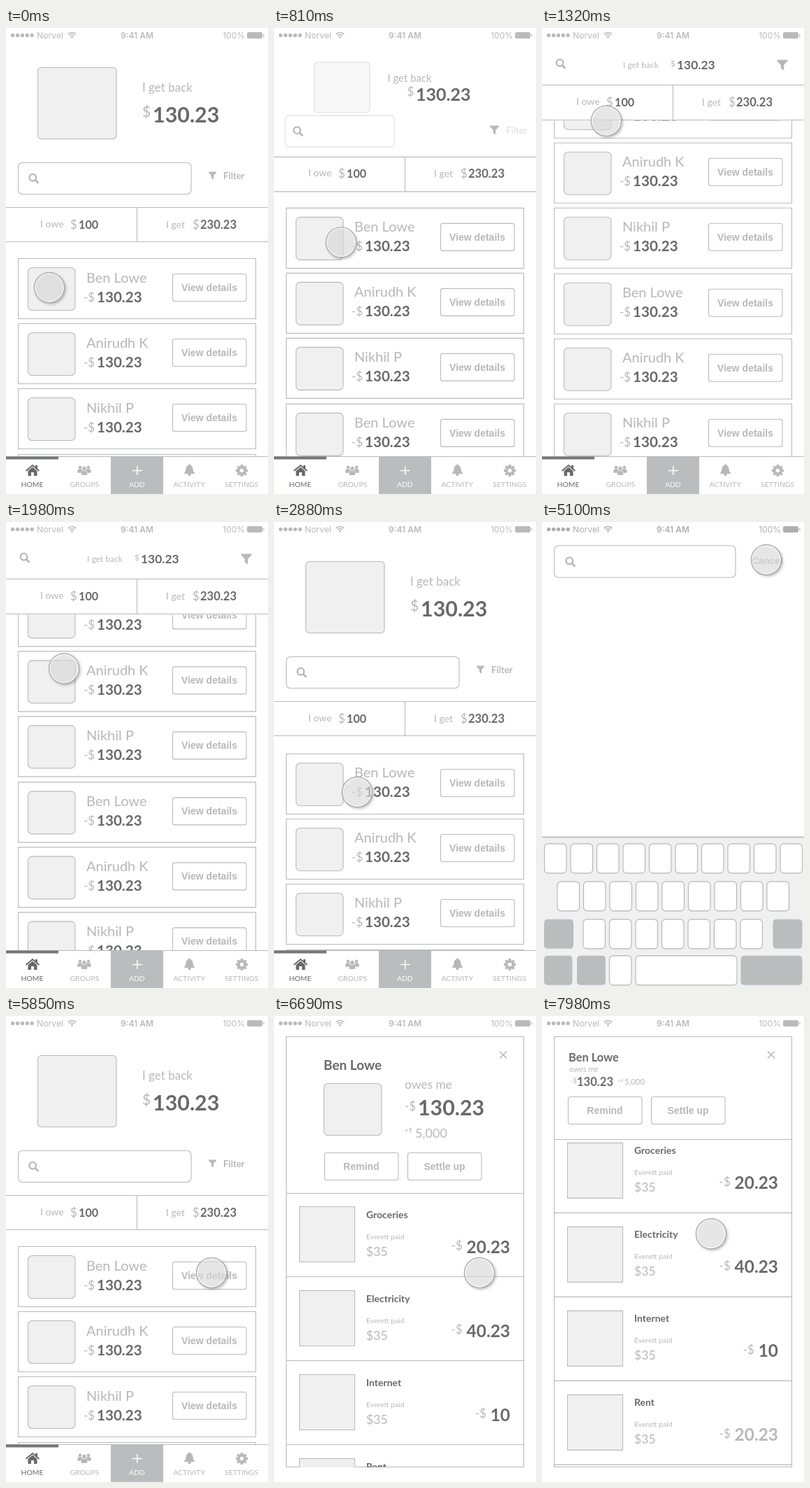
An HTML page with a canvas that plays this animation: 375x666 px, repeating every 8000 ms.

```html
<!DOCTYPE html>
<html lang="en">
<head>
<meta charset="utf-8">
<title>Shared expenses wireframe</title>
<style>
html, body { margin: 0; width: 100%; height: 100%; overflow: hidden; background: #fff; }
canvas { display: block; width: 375px; height: 666px; }
</style>
</head>
<body>
<canvas id="stage"></canvas>
<script>
const W = 375, H = 666, LOOP = 8000;
const LIGHT = '#b7b8b9', DARK = '#68696a', LINE = '#b9babb', FILL = '#f0f0f0', GREY = '#bbbcbd';
const LATO = 'Lato, "Open Sans", "Noto Sans", sans-serif';
const ARIAL = '"Liberation Sans", Arial, sans-serif';
const INTER = 'Inter, Roboto, sans-serif';
const PEOPLE = ['Ben Lowe', 'Anirudh K', 'Nikhil P'];
const BILLS = [['Groceries', '20.23'], ['Electricity', '40.23'], ['Internet', '10'], ['Rent', '20.23']];

const canvas = document.getElementById('stage');
const c = canvas.getContext('2d');
const dpr = window.devicePixelRatio || 1;
canvas.width = W * dpr;
canvas.height = H * dpr;

// [time, value...]
const POINTER = [
  [30, 62, 371], [270, 97, 371], [450, 97, 371], [1320, 92, 133], [1520, 88, 77], [1640, 84, 77],
  [1980, 83, 209], [2400, 119, 386], [2900, 119, 386], [3240, 137, 216], [4270, 137, 216],
  [4710, 321, 54], [5350, 321, 54], [5850, 294, 367], [7060, 294, 367], [7290, 242, 402],
  [7430, 242, 402], [8000, 242, 311]
];
const HOME_SCROLL = [
  [440, 0], [1320, 258], [1520, 318], [1660, 350], [1980, 238], [2350, 55], [2560, -14], [2880, -2], [3060, 0]
];
const BILL_SCROLL = [[7430, 0], [7980, 91], [8000, 92]];

const clamp = v => Math.max(0, Math.min(1, v));
const mix = (a, b, k) => a + (b - a) * k;
const mixAll = (a, b, k) => a.map((v, i) => mix(v, b[i], k));
const grey = v => `rgb(${v},${v},${v})`;
const ease = v => { const k = clamp(v), u = 1 - k; return 1 - u * u * u * (1 + 2 * k); };
const span = (t, a, b) => ease((t - a) / (b - a));

// Monotone cubic through the keys
function track(keys, t, n = 1) {
  const last = keys.length - 1;
  if (t <= keys[0][0]) return keys[0][n];
  if (t >= keys[last][0]) return keys[last][n];
  const slope = i => (keys[i + 1][n] - keys[i][n]) / (keys[i + 1][0] - keys[i][0]);
  const tangent = i => {
    if (i === 0 || i === last) return 0;
    const a = slope(i - 1), b = slope(i);
    return a * b <= 0 ? 0 : 2 * a * b / (a + b);
  };
  let i = 0;
  while (t > keys[i + 1][0]) i++;
  const h = keys[i + 1][0] - keys[i][0], u = (t - keys[i][0]) / h, v = 1 - u;
  return keys[i][n] * v * v * (1 + 2 * u) + keys[i + 1][n] * u * u * (3 - 2 * u)
    + h * u * v * (v * tangent(i) - u * tangent(i + 1));
}

function fade(alpha, draw) {
  if (alpha <= 0.002) return;
  c.save();
  c.globalAlpha *= clamp(alpha);
  draw();
  c.restore();
}

function clipTo(x, y, w, h, draw) {
  c.save();
  c.beginPath();
  c.rect(x, y, w, h);
  c.clip();
  draw();
  c.restore();
}

function text(s, x, y, size, color = LIGHT, weight = 400, font = LATO, align = 'left') {
  c.font = `${weight} ${size}px ${font}`;
  c.fillStyle = color;
  c.textAlign = align;
  c.fillText(s, x, y);
}

function box(x, y, w, h, r, fill, stroke = LINE, width = 1.1) {
  c.beginPath();
  c.roundRect(x, y, w, h, r);
  if (fill) { c.fillStyle = fill; c.fill(); }
  if (stroke) { c.strokeStyle = stroke; c.lineWidth = width; c.stroke(); }
}

function line(x1, y1, x2, y2, width = 1.1, color = LINE) {
  c.beginPath();
  c.moveTo(x1, y1);
  c.lineTo(x2, y2);
  c.strokeStyle = color;
  c.lineWidth = width;
  c.stroke();
}

function disc(x, y, r, color) {
  c.beginPath();
  c.arc(x, y, r, 0, Math.PI * 2);
  c.fillStyle = color;
  c.fill();
}

function ring(x, y, r, color, width) {
  c.beginPath();
  c.arc(x, y, r, 0, Math.PI * 2);
  c.strokeStyle = color;
  c.lineWidth = width;
  c.stroke();
}

function poly(points, color) {
  c.beginPath();
  points.forEach(([x, y]) => c.lineTo(x, y));
  c.closePath();
  c.fillStyle = color;
  c.fill();
}

function button(label, x, y) {
  box(x, y, 105.5, 39, 3);
  text(label, x + 52.5, y + 24.5, 14, LIGHT, 700, ARIAL, 'center');
}

function magnifier(x, y) {
  ring(x - 1.3, y - 1.3, 4.8, LIGHT, 2.3);
  c.lineCap = 'round';
  line(x + 2.5, y + 2.5, x + 6, y + 6, 2.8, LIGHT);
  c.lineCap = 'butt';
}

function funnel(x, y, size) {
  const p = [[-.5, -.5], [.5, -.5], [.5, -.38], [.14, 0], [.14, .52], [-.14, .3], [-.14, 0], [-.5, -.38]];
  poly(p.map(([a, b]) => [x + a * size, y + b * size]), LIGHT);
}

function statusBar(q) {
  const color = grey(Math.round(mix(186, 174, q)));
  for (let i = 0; i < 5; i++) disc(9.6 + i * 6.9, 10.5, 2.7, color);
  text('Norvel', 44, 14.6, 12.2, color, 400, INTER);
  c.strokeStyle = color;
  c.lineWidth = 1.6;
  for (const r of [8, 5]) {
    c.beginPath();
    c.arc(94.5, 14.5, r, -Math.PI * 0.76, -Math.PI * 0.24);
    c.stroke();
  }
  disc(94.5, 13, 1.6, color);
  text('9:41 AM', 187.5, 14.6, 12, color, 600, INTER, 'center');
  text('100%', 342, 14.6, 12, color, 400, INTER, 'right');
  box(345.5, 6.5, 21, 8, 1.5, color, color, 1);
  box(368, 8.7, 1.5, 3.6, .7, color, null);
}

function personRow(name, y) {
  box(17.5, y, 340, 86, 0);
  box(31.5, y + 13, 67.5, 61, 6, FILL);
  text(name, 115, y + 34, 20);
  text('-$', 111, y + 61, 17);
  text('130.23', 130, y + 62, 20.6, DARK, 700);
  button('View details', 238.5, y + 22);
}

function homeHeader(p) {
  fade(1 - p * 1.3, () => box(...mixAll([45.5, 56.5, 112.5, 102], [75, 38, 32, 29], p), 5, FILL));
  text('I get back', mix(195, 116, p), mix(91, 57, p), mix(17, 12, p));
  text('$', mix(195, 184, p), mix(127, 55, p), mix(21, 12, p));
  text('130.23', mix(210, 193, p), mix(135, 59, p), mix(30.4, 17.4, p), DARK, 700);
  funnel(mix(295.5, 344, p), mix(211, 53, p), mix(11, 15, p));
  fade(1 - p * 1.5, () => text('Filter', mix(311, 362, p), mix(216, 58, p), 13, LIGHT, 700));
}

function totals(p) {
  const y = 256.5 - 175 * p, bottom = mix(305.5, 131.5, p);
  line(0, y, W, y);
  line(0, bottom, W, bottom);
  line(187.5, y, 187.5, bottom);
  text('I owe', 49, y + 28, 14);
  text('$', 92, y + 30, 17);
  text('100', 104, y + 30, 16.2, DARK, 700);
  text('I get', 229, y + 29, 14);
  text('$', 267, y + 30, 17);
  text('230.23', 278, y + 30, 16.6, DARK, 700);
  return bottom;
}

function home(scroll) {
  const p = clamp(scroll / 175);
  homeHeader(p);
  const top = totals(p) + 1;
  clipTo(0, top, W, 612 - top, () => {
    for (let i = 0; i < 12; i++) {
      const y = 329.5 + Math.floor(i * 280 / 3) - scroll;
      if (y > -90 && y < 620) personRow(PEOPLE[i % 3], y);
    }
  });
}

function searchBox(p, q) {
  const rect = mixAll(mixAll([17.5, 192.5, 247.5, 45], [14, 29, 26, 45], p), [17.5, 33.5, 259.5, 45.5], q);
  fade(1 - p * 1.3, () => box(...rect, 6));
  magnifier(mix(mix(39.5, 26.8, p), 40.5, q), mix(mix(215, 51, p), 56.5, q));
}

function person(x, y, k, color) {
  disc(x, y - 4.2 * k, 2.8 * k, color);
  c.beginPath();
  c.roundRect(x - 4.6 * k, y - .8 * k, 9.2 * k, 6.6 * k, [3 * k, 3 * k, 1, 1]);
  c.fill();
}

function bell(x, y) {
  c.beginPath();
  c.moveTo(x - 8, y + 5);
  c.quadraticCurveTo(x - 5, y + 2, x - 5, y - 2);
  c.quadraticCurveTo(x - 4.5, y - 7, x, y - 7.5);
  c.quadraticCurveTo(x + 4.5, y - 7, x + 5, y - 2);
  c.quadraticCurveTo(x + 5, y + 2, x + 8, y + 5);
  c.fillStyle = LIGHT;
  c.fill();
  disc(x, y + 6, 2.2, LIGHT);
  disc(x, y - 7.5, 1.2, LIGHT);
}

function gear(x, y) {
  for (let i = 0; i < 8; i++) {
    const a = i * Math.PI / 4;
    line(x, y, x + 8.5 * Math.cos(a), y + 8.5 * Math.sin(a), 3.8, LIGHT);
  }
  disc(x, y, 6.5, LIGHT);
  disc(x, y, 2.8, '#fff');
}

function house(x, y) {
  poly([[x - 6.5, y + 1], [x, y - 4.5], [x + 6.5, y + 1], [x + 6.5, y + 8], [x + 2, y + 8],
    [x + 2, y + 3], [x - 2, y + 3], [x - 2, y + 8], [x - 6.5, y + 8]], DARK);
  poly([[x + 4, y - 7], [x + 7, y - 7], [x + 7, y - 1], [x + 4, y - 4]], DARK);
  c.beginPath();
  c.moveTo(x - 9.5, y + 1);
  c.lineTo(x, y - 7);
  c.lineTo(x + 9.5, y + 1);
  c.strokeStyle = DARK;
  c.lineWidth = 2;
  c.stroke();
}

function tabBar() {
  c.fillStyle = '#fff';
  c.fillRect(0, 612, W, 54);
  line(0, 612.5, W, 612.5);
  c.fillStyle = GREY;
  c.fillRect(150, 613, 75, 53);
  c.fillStyle = '#757677';
  c.fillRect(0, 612.5, 75, 4);
  house(38, 632);
  person(106, 631, .8, LIGHT);
  person(118, 631, .8, LIGHT);
  person(112, 633.5, 1.05, '#fff');
  person(112, 633.5, .95, LIGHT);
  line(181, 632.5, 194.5, 632.5, 1.5, '#fff');
  line(187.8, 626, 187.8, 639, 1.5, '#fff');
  bell(262.5, 632);
  gear(337.5, 632.5);
  ['HOME', 'GROUPS', 'ADD', 'ACTIVITY', 'SETTINGS'].forEach((s, i) =>
    text(s, 37.5 + i * 74.9, 656, 10.4, [DARK, LIGHT, '#fff'][i] || LIGHT, 400, LATO, 'center'));
}

function keyboard() {
  c.fillStyle = '#f0f0f0';
  c.fillRect(0, 450, W, 216);
  line(0, 450, W, 450, 1.6);
  const key = (x, y, w = 31.5) => box(x, y, w, 42, 5, '#fff', '#b4b5b6');
  const dark = (x, y, w) => box(x, y, w, 42, 5, GREY, null);
  [[3.5, 459.5, 10], [22, 513.5, 9], [59, 567.5, 7]].forEach(([x, y, n]) => {
    for (let i = 0; i < n; i++) key(x + i * 37.5, y);
  });
  dark(3, 567.5, 42);
  dark(330.5, 567.5, 42);
  dark(3, 619.5, 40.5);
  dark(50, 619.5, 41);
  key(96.5, 619.5);
  key(134, 619.5, 145);
  dark(284.5, 619.5, 88);
}

function bill([title, amount], y, muted) {
  box(36.5, y + 20, 79, 79, 0, FILL);
  text(title, 132, y + 36, 14, DARK, 700);
  text('Everett paid', 132, y + 66, 10.4);
  text('$35', 132, y + 90, 17.6);
  text(amount, 338, y + 86, 24.4, muted ? LIGHT : DARK, 700, LATO, 'right');
  text('-$', 338 - c.measureText(amount).width - 22, y + 81.5, 17);
  line(17.5, y + 120, 357.5, y + 120);
}

function detail(d, scroll) {
  const p = clamp(scroll / 77);
  const card = mixAll([17.5, 329.5, 340, 86], [17.5, 29.5, 340, 615], d);
  const drop = card[1] - 29.5;
  // row place -> open place -> collapsed place
  const at = (row, open, small) => mixAll(mixAll(row, open, d), small, p);
  fade(d * 6, () => box(...card, 0, '#fff'));
  fade(1 - d * 2, () => button('View details', 238.5, card[1] + 22));

  clipTo(17, card[1] - 1, 341, card[3] + 2, () => {
    fade(d, () => {
      const top = mix(253.5, 176.5, p) + drop;
      clipTo(17, top, 341, 645 - top, () =>
        BILLS.forEach((b, i) => bill(b, 252.5 + i * 120 - scroll + drop, i === 3)));
      line(17.5, top, 357.5, top);
      const by = mix(195.5, 115.5, p) + drop;
      button('Remind', mix(72.5, 37.5, p), by);
      button('Settle up', mix(191.5, 156.5, p), by);
      text('owes me', mix(187, 39, p), mix(104, 80, p) + drop, mix(17.4, 10.7, p));
      text('+₹', mix(187, 109, p), mix(167, 95, p) + drop, mix(9.5, 6, p));
      text('5,000', mix(202, 118, p), mix(174, 98, p) + drop, mix(18, 11.4, p));
      const y = 55.5 + drop;
      line(323, y - 5, 333, y + 5, 1.6, LIGHT);
      line(323, y + 5, 333, y - 5, 1.6, LIGHT);
    });
  });

  fade(1 - p * 1.3, () => box(...at([31.5, 342.5, 67.5, 61], [71.5, 96.5, 82.5, 74], [38, 70, 30, 28]), 6, FILL));
  const [nx, ny, ns] = at([115, 363.5, 20], [71, 77, 19], [38, 65, 16.4]);
  text(PEOPLE[0], nx, ny, ns, grey(Math.round(mix(184, 105, d))), d > .3 ? 700 : 400);
  const [sx, sy, ss] = at([111, 390.5, 17], [187, 135, 17], [41, 96, 9.5]);
  text('-$', sx, sy, ss);
  const [ax, ay, as] = at([130, 391.5, 20.6], [206, 142, 30.3], [50, 100, 16.6]);
  text('130.23', ax, ay, as, DARK, 700);
}

function pointer(x, y) {
  // Shadow only outside the disc, so the see-through fill stays light
  c.save();
  c.beginPath();
  c.rect(0, 0, W, H);
  c.arc(x, y, 21.5, 0, Math.PI * 2);
  c.clip('evenodd');
  c.shadowColor = 'rgba(0,0,0,.3)';
  c.shadowBlur = 4 * dpr;
  c.shadowOffsetX = c.shadowOffsetY = 2 * dpr;
  disc(x, y, 21.5, '#aaa');
  c.restore();
  disc(x, y, 21.5, 'rgba(217,217,217,.65)');
  ring(x, y, 20.2, 'rgba(255,255,255,.6)', 1.5);
  ring(x, y, 21.6, '#a8a8a8', 1.2);
}

function draw(t) {
  const scroll = track(HOME_SCROLL, t);
  const q = span(t, 3430, 4050) - span(t, 5100, 5700);
  const d = span(t, 5980, 6690);
  c.setTransform(dpr, 0, 0, dpr, 0, 0);
  c.fillStyle = '#fff';
  c.fillRect(0, 0, W, H);

  fade(1 - d, () => {
    fade(1 - q, () => home(scroll));
    searchBox(clamp(scroll / 175), q);
    fade(q, () => text('Cancel', 300, 60, 13.6, LIGHT, 700, ARIAL));
    c.save();
    c.translate(0, q * 54);
    tabBar();
    c.restore();
    if (q > 0) {
      c.save();
      c.translate(0, (1 - q) * 217);
      keyboard();
      c.restore();
    }
  });
  if (d > 0) detail(d, track(BILL_SCROLL, t));
  statusBar(q);
  pointer(track(POINTER, t, 1), track(POINTER, t, 2));
}

const start = performance.now();
function tick() {
  draw((performance.now() - start) % LOOP);
  requestAnimationFrame(tick);
}
tick();
</script>
</body>
</html>
```
